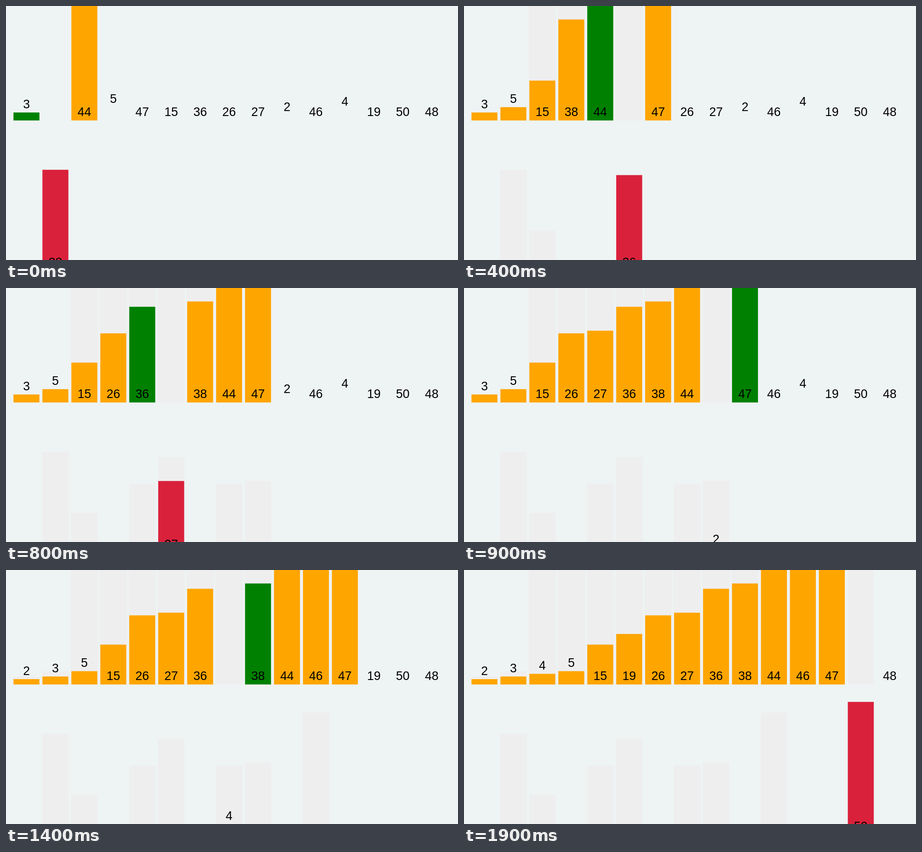
An HTML page that plays this animation: 998x561 px, repeating every 2000 ms.

```html
<!DOCTYPE html>
<html lang="en">
<head>
<meta charset="utf-8">
<title>Insertion sort</title>
<style>
  html, body { margin: 0; width: 100%; height: 100%; overflow: hidden; background: #eef3f4; }
  svg { display: block; width: 100%; height: 100%; }
  text { font: 27px "Liberation Sans", Arial, sans-serif; text-anchor: middle; fill: #000; }
</style>
</head>
<body>
<svg id="stage" viewBox="0 0 998 561"></svg>
<script>
const stage = document.getElementById("stage");
const ORANGE = [255, 165, 0], GREEN = [0, 128, 0], RED = [218, 33, 59], GHOST = [238, 238, 238];
const STEP = 63.92, LEFT = 16.5, WIDTH = 57.3, BASE = 252.8, UNIT = 5.87, DROP = 332;
const TICK = 100, TICKS = 20;
const START = 3.39, SPEED = 6.06, FADE = 0.073;

// Every state of the sort, from the moment 38 is lifted out.
function sortStates(values) {
  const states = [], a = [...values];
  for (let i = 2; i < a.length; i++) {
    const key = a[i];
    let gap = i;
    a[gap] = null;
    const save = (more = {}) => states.push({ bars: [...a], i, key, gap, ...more });
    save();
    while (gap > 0) {
      save({ active: gap - 1, last: gap < i ? gap + 1 : -1, fades: true });
      if (a[gap - 1] < key) break;
      a[gap] = a[gap - 1];
      a[--gap] = null;
      save({ active: gap + 1 });
    }
    a[gap] = key;
    save({ gap: -1 });
  }
  return states;
}

const states = sortStates([3, 44, 38, 5, 47, 15, 36, 26, 27, 2, 46, 4, 19, 50, 48]);

const rgb = c => `rgb(${c.map(Math.round).join()})`;
const mix = (a, b, k) => a.map((v, n) => v + (b[n] - v) * k);

function bar(col, value, color, drop = 0, grow = 0) {
  const h = value * UNIT;
  return `<rect x="${LEFT + col * STEP - grow}" y="${BASE - h + drop}" ` +
    `width="${WIDTH + 2 * grow}" height="${h}" fill="${rgb(color)}"/>`;
}

function label(col, value, drop = 0) {
  const y = value < 10 ? BASE - value * UNIT - 9.5 : 243.4;
  return `<text x="${LEFT + col * STEP + WIDTH / 2}" y="${y + drop}">${value}</text>`;
}

function stateAt(tick) {
  const p = START + SPEED * tick, n = Math.floor(p);
  return { ...states[n], k: Math.min(1, (p - n) / FADE) };
}

// Tallest bar each column has held since the loop began.
function trails(tick) {
  const upper = [], lower = [];
  const keep = (list, col, v) => list[col] = Math.max(list[col] || 0, v);
  for (let n = 0; n <= tick; n++) {
    const s = stateAt(n);
    for (let c = 0; c <= s.i; c++) if (c !== s.gap) keep(upper, c, s.bars[c]);
    if (n) keep(upper, s.i, s.key);
    if (s.gap >= 0) keep(lower, s.gap, s.key);
  }
  return { upper, lower };
}

function draw(tick) {
  const s = stateAt(tick), { upper, lower } = trails(tick);
  let out = "";
  upper.forEach((v, c) => { if (c !== s.gap || tick) out += bar(c, v, GHOST, 0, c < 13 && v > s.bars[c] + 2 || c === s.gap && c < s.i ? 1.5 : 0); });
  lower.forEach((v, c) => out += bar(c, v, GHOST, DROP, 0.5));
  s.bars.forEach((v, c) => {
    if (v === null) return;
    if (c <= s.i) {
      const k = s.fades ? s.k : 1;
      const color = c === s.active ? mix(ORANGE, GREEN, k)
        : c === s.last ? mix(GREEN, ORANGE, k) : ORANGE;
      out += bar(c, v, color);
    }
    out += label(c, v);
  });
  if (s.gap >= 0) {
    // The shortest lifted bars reach below the stage edge.
    out += bar(s.gap, s.key, RED, DROP) + label(s.gap, s.key, DROP);
  }
  stage.innerHTML = out;
}

let shown = -1;
const begin = performance.now();
function frame() {
  const tick = Math.floor((performance.now() - begin) / TICK) % TICKS;
  if (tick !== shown) draw(shown = tick);
  requestAnimationFrame(frame);
}
frame();
</script>
</body>
</html>
```
